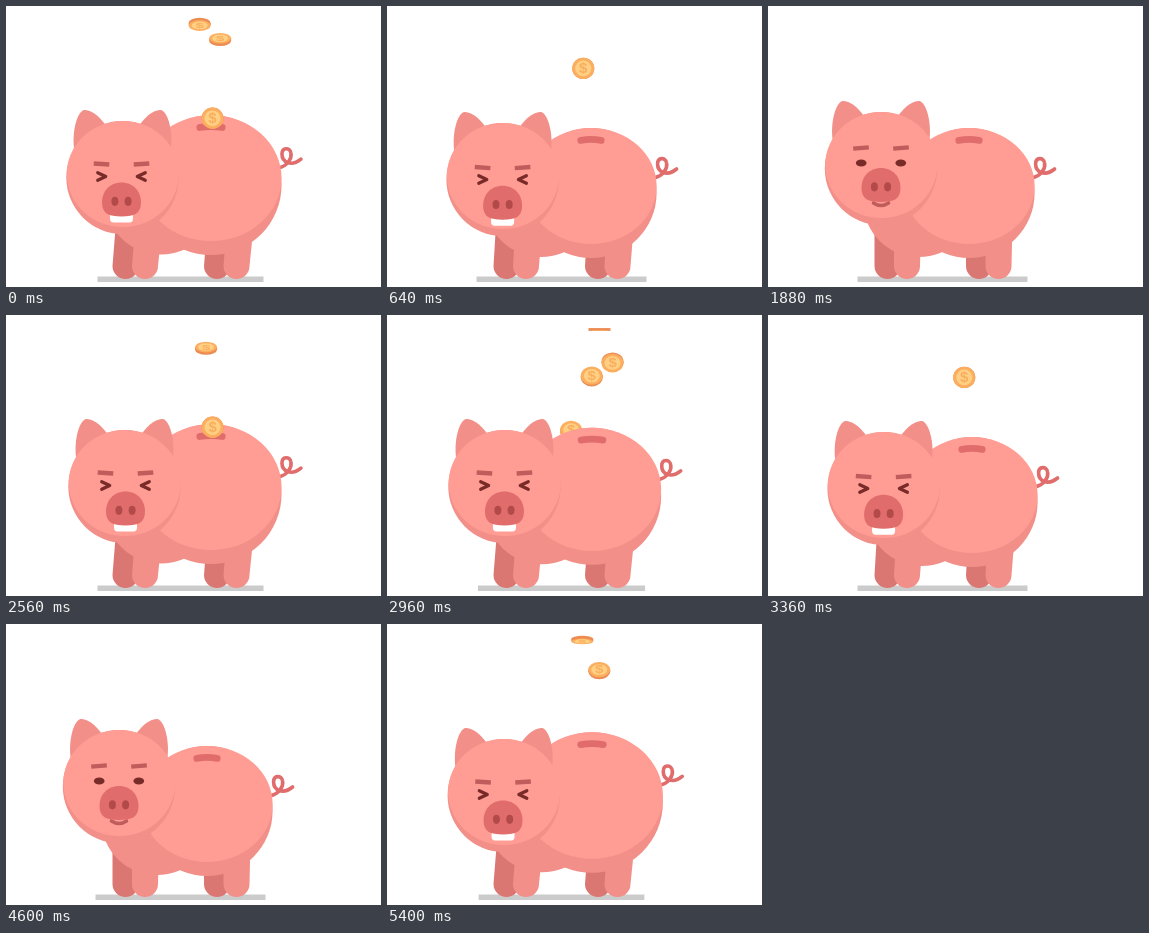
An HTML page with a canvas for the animation above (5440 ms loop, 375 by 281 pixels).

```html
<!DOCTYPE html>
<html lang="en">
<head>
<meta charset="utf-8">
<title>Piggy bank</title>
<style>
  html, body { margin: 0; width: 100%; height: 100%; overflow: hidden; background: #fff; }
  canvas { display: block; width: 375px; height: 281px; }
</style>
</head>
<body>
<canvas id="stage"></canvas>
<script>
const W = 375, H = 281, LOOP = 2720, STEP = 40, TAU = Math.PI * 2;
const LIGHT = '#ff9d94', SHADE = '#f28f89', DARK = '#db7773', ROSE = '#e06d6c',
      BROW = '#c05c5b', EYE = '#782b28', NOSTRIL = '#b34a4a';

const canvas = document.getElementById('stage');
const ctx = canvas.getContext('2d');
const dpr = window.devicePixelRatio || 1;
canvas.width = W * dpr;
canvas.height = H * dpr;

// time, head x, head y, body x, swelling, strain
const KEYS = [
  [0, 117.5, 168, 205, 1, 1],
  [340, 117.5, 168, 205, 1, 1],
  [640, 115.6, 170, 204, 0, 1.22],
  [960, 111.5, 152, 200, 0, 0],
  [1120, 112, 153, 199, 0, 0],
  [1640, 112, 153, 199, 0, 0],
  [1880, 113, 159, 201, 0, 0],
  [2080, 110.5, 146, 202, .5, 0],
  [2320, 117.5, 168, 205, 1, 1],
  [LOOP, 117.5, 168, 205, 1, 1]
];

// launch time, gravity, lift and drift per step
const COINS = [
  [-320, 2, 27.85, -1.6],
  [-160, 2.2, 28.6, 1.9],
  [0, 2.1, 29, 1],
  [160, 2.12, 29.7, -.85]
];

function poseAt(t) {
  const i = KEYS.findIndex(k => k[0] > t);
  const a = KEYS[i - 1], b = KEYS[i];
  const p = (t - a[0]) / (b[0] - a[0]), e = p * p * (3 - 2 * p);
  return a.map((v, j) => v + (b[j] - v) * e).slice(1);
}

function ellipse(x, y, rx, ry, color) {
  ctx.fillStyle = color;
  ctx.beginPath();
  ctx.ellipse(x, y, rx, ry, 0, 0, TAU);
  ctx.fill();
}

function fillPath(d, color) {
  ctx.fillStyle = color;
  ctx.fill(new Path2D(d));
}

function line(d, color, width, cap = 'round') {
  ctx.strokeStyle = color;
  ctx.lineWidth = width;
  ctx.lineCap = cap;
  ctx.lineJoin = 'round';
  ctx.stroke(new Path2D(d));
}

function at(x, y, angle, draw) {
  ctx.save();
  ctx.translate(x, y);
  ctx.rotate(angle);
  draw();
  ctx.restore();
}

function drawCoin(x, y, turn) {
  const c = Math.max(Math.abs(Math.cos(turn)), .02);
  const lift = 1.4 * Math.sin(turn) * (Math.cos(turn) < 0 ? -1 : 1);
  at(x, y, 0, () => {
    ellipse(0, lift, 11, 10.7 * c, '#ec8b52');
    ctx.fillRect(-11, -Math.abs(lift), 22, 2 * Math.abs(lift));
    ctx.translate(0, -lift);
    ctx.scale(1, c);
    ellipse(0, 0, 11, 10.7, '#fbae60');
    ellipse(0, 0, 8, 7.8, '#ffd083');
    ctx.fillStyle = '#f9ae5f';
    ctx.font = 'bold 15px "Liberation Sans", Arial, sans-serif';
    ctx.textAlign = 'center';
    ctx.textBaseline = 'middle';
    ctx.fillText('$', 0, .8);
  });
}

function drawCoins(t, falling) {
  for (const [start, gravity, lift, drift] of COINS) {
    const n = ((t - start + LOOP) % LOOP) / STEP;
    const y = 113 - lift * n + gravity * n * n;
    if (y < 150 && (n > lift / gravity / 2) === falling)
      drawCoin(206.5 + drift * n, y, n * Math.PI / 12);
  }
}

function drawLeg(x, lean, color) {
  fillPath(`M${x + lean} 215 L${x} 260 a13 13 0 0 0 26 0 L${x + 27 + lean} 215Z`, color);
}

function drawBody(bx, s, wag) {
  const top = 122 - 13 * s, bottom = 252 - 3 * s, rx = 65.6 + 5 * s;
  const ry = (bottom - top) / 2, half = 85 - 2 * s;
  const lean = (bx - 201) * .9;

  ctx.fillStyle = '#cccbcb';
  ctx.fillRect(174.5 - half, 270.5, half * 2, 5.5);
  drawLeg(106.5, lean, DARK);
  drawLeg(198, lean, DARK);
  drawLeg(126, lean, SHADE);
  drawLeg(217.5, lean, SHADE);

  at(bx + rx + 5 - s * .6, top + 38 + 3 * s, wag, () =>
    line('M-8 12 C2 10 6 2 5 -3 C4 -9 -4 -9 -4 -2 C-4 6 5 11 15 3', ROSE, 3.6));

  ellipse(bx - 50, 198 - 2.5 * s, 55, 53, SHADE);
  ellipse(bx, (top + bottom) / 2, rx, ry, SHADE);
  ellipse(bx, top + ry - 7, rx, ry - 7, LIGHT);
  at(bx, top + 11.5, 0, () => {
    const w = 10.2 + s;
    line(`M${-w} .8 Q0 -1 ${w} .8`, ROSE, 6.8);
  });
}

function drawFace(strain, squint, lid) {
  const eyeY = -2 + strain * 4.5, snoutY = 21 + strain * 5.5, browY = -17 + strain * 7;
  for (const side of [-1, 1]) {
    at(side * 20, browY, squint ? -side * .07 : -.08, () =>
      line('M-7.8 0 H7.8', BROW, 4.4, 'butt'));
    at(side * 19.8, eyeY, 0, () => {
      if (!squint) return ellipse(0, 0, 5.4, lid, EYE);
      ctx.scale(-side, 1);
      line('M-4 -3.8 L4 0 L-4 3.8', EYE, 3.2);
    });
  }
  at(0, snoutY, 0, () => {
    if (squint)
      fillPath('M-11.5 14 H11.5 V18 Q11.5 22 8 22 H-8 Q-11.5 22 -11.5 18Z', '#fff');
    else
      line('M-7.5 17 Q0 22 7.5 17', BROW, 3.6);
    fillPath('M0 -18 C12 -18 19.5 -9 19.5 2 C19.5 13 13 16 0 16 C-13 16 -19.5 13 -19.5 2 C-19.5 -9 -12 -18 0 -18Z', ROSE);
    for (const side of [-1, 1]) ellipse(side * 6.6, .8, 3.5, 4.6, NOSTRIL);
  });
}

function drawHead(x, y, look, strain, squint, lid, twitch) {
  at(x, y, 0, () => {
    for (const side of [-1, 1]) {
      ctx.save();
      ctx.scale(side, 1);
      at(34.5, -28, twitch, () =>
        fillPath('M-20 -17 C-14 -28 -3 -37 4 -36 C11 -34 16 -15 14 2 L10 14 L-10 10Z', SHADE));
      ctx.restore();
    }
    ellipse(0, 3.5, 56.2, 56.5, SHADE);
    ellipse(.3, 0, 56, 53, LIGHT);
    ctx.translate(look, 0);
    drawFace(strain, squint, lid);
  });
}

function draw(t) {
  const [hx, hy, bx, swell, strain] = poseAt(t);
  const pulse = .5 - .5 * Math.cos(TAU * (t - 136) / 160);
  const s = swell * (1.1 - .5 * pulse);
  const beat = (t - 2560 + LOOP) % LOOP;
  const shake = swell * strain * Math.cos(TAU * beat / 320);
  const settle = t > 960 && t < 1320 ? Math.sin((t - 960) / 60 * Math.PI) * (1320 - t) / 360 : 0;
  const squint = t < 800 || t >= 2200;
  const lid = 3.5 + Math.max(0, Math.min(1, (1880 - t) / 200, (t - 800) / 250)) * 1.5;

  ctx.setTransform(dpr, 0, 0, dpr, 0, 0);
  ctx.fillStyle = '#fff';
  ctx.fillRect(0, 0, W, H);
  drawCoins(t, true);
  drawBody(bx, s, settle * .08);
  drawHead(hx + shake, hy, shake, strain, squint, lid, settle * .06);
  drawCoins(t, false);
}

const start = performance.now();
function frame() {
  draw((performance.now() - start) % LOOP);
  requestAnimationFrame(frame);
}
frame();
</script>
</body>
</html>
```
